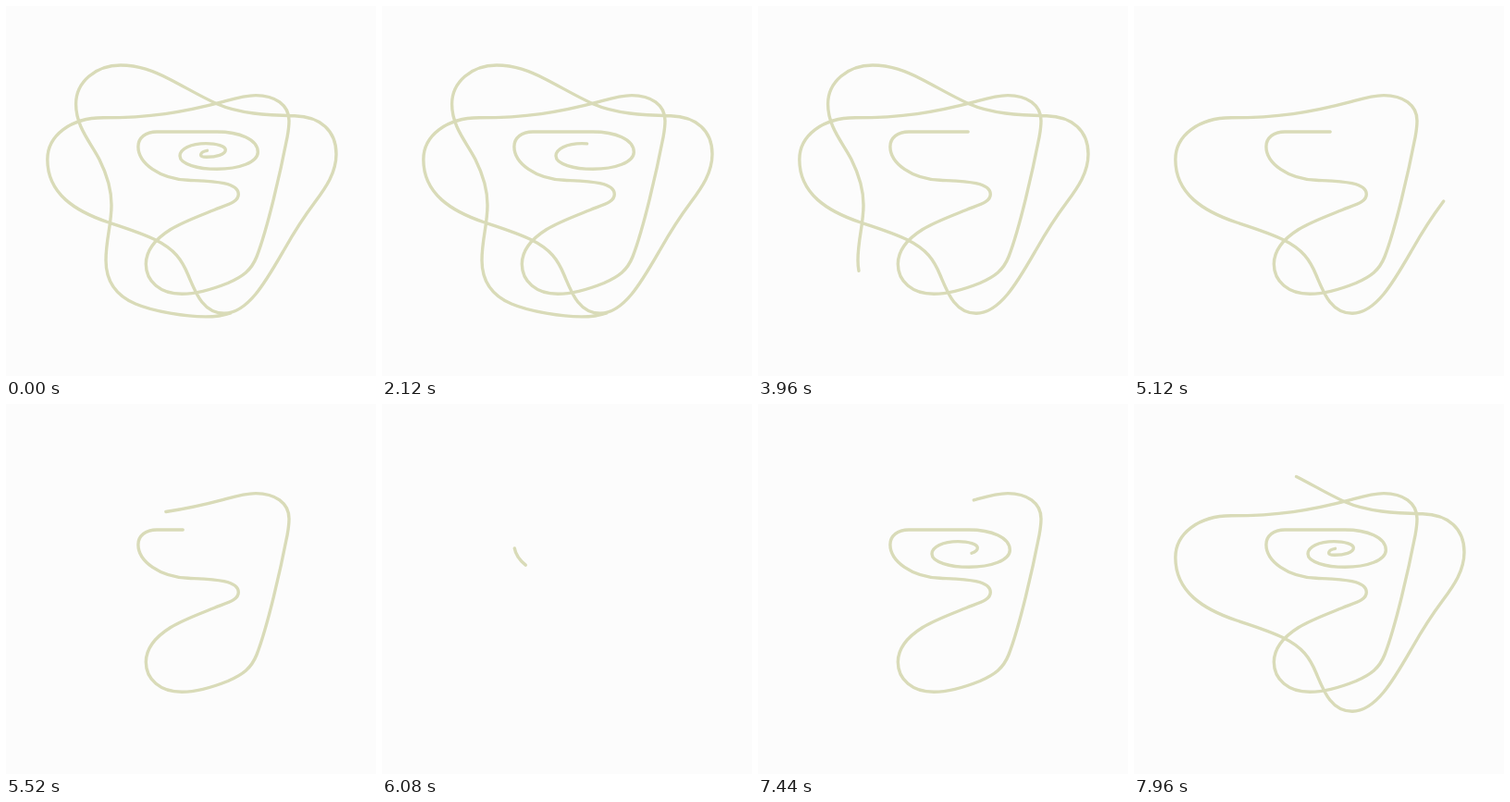
An HTML page that plays this animation: 400 by 400 pixels, repeating every 8000 ms.

```html
<!DOCTYPE html>
<html lang="en">
<head>
<meta charset="utf-8">
<title>Looping line</title>
<style>
  html, body { margin: 0; width: 100%; height: 100%; overflow: hidden; background: #fcfcfc; }
  svg { display: block; width: 100%; height: 100%; }
  path { fill: none; stroke: #d9dbb8; stroke-width: 3.4; stroke-linecap: round; stroke-linejoin: round; }
</style>
</head>
<body>
<svg viewBox="0 0 400 400">
  <path id="line" d="M217.5 156.3
    C213.5 157 210.6 158.7 210.6 161 C210.6 163 213.5 163.3 217 163.3
    C227 163.3 237.3 160.5 237.3 155.5 C237.3 151.5 228 148.6 216 148.6
    C200 148.6 188 154.5 188 162 C188 171 208 176.3 228 176.3
    C252 176.3 272.3 169 272.3 158 C272.3 144 252 136 228 136
    L163 136 C151 136 142.9 142.5 142.9 152
    C142.9 170 166 187 197 188.3 C220 189.5 251.3 189.5 251.3 203.5
    C251.3 212 240 214.5 225 220.5 C205 228.5 190 234 178 241.5
    C162 251.5 151.3 264 151.3 279 C151.3 298 167 311.3 190 311.3
    C206 311.3 225 305.5 240 299.5 C256 292.5 265 286 271 271
    C283 240 297 178 304 142 C305.5 134 306 130 306 124
    C306 107 291 96.6 270 96.6 C258 96.6 247 100 236 103.2
    C190 115.5 155 120.8 105 120.8 C70 120.8 44.8 140 44.8 166
    C44.8 203 75 222 111 234 C131 240.5 147 245.5 162 253
    C182 263 190 274 197 291 C205 310 213 332.3 236 332.3
    C262 332.3 282 296 301 263 C312 243.5 322 228 334 212
    C346 196 357 180 357 160 C357 135 340 119.5 312 118.8
    C282 118 252 116.5 228 105.8 C210 97.5 195 88.5 178 79.7
    C159 70 143 64 124 64 C97 64 75.6 82 75.6 106
    C75.6 131 92 148 101 166 C109 182 114 198 114 215
    C114 237 108 252 108 275 C108 300 121 314 140 322
    C160 330.5 195 336 216 335.9 C226 335.9 235 334.5 243 331.8"/>
</svg>
<script>
const LOOP = 8000;
const line = document.getElementById('line');
const total = line.getTotalLength();

// Length along the line closest to (x, y), searched around a rough guess.
function lengthAt(x, y, guess) {
  let best = 0, bestDist = Infinity;
  const last = Math.min(total, guess + 80);
  for (let s = Math.max(0, guess - 80); s <= last; s += 0.5) {
    const p = line.getPointAtLength(s);
    const dist = Math.hypot(p.x - x, p.y - y);
    if (dist < bestDist) { bestDist = dist; best = s; }
  }
  return best;
}

// Smooth monotone curve through keys of [time, length].
function monotone(keys) {
  const n = keys.length;
  const rise = i => (keys[i + 1][1] - keys[i][1]) / (keys[i + 1][0] - keys[i][0]);
  const slope = keys.map((_, i) => {
    if (i === 0 || i === n - 1) return 0;
    const a = rise(i - 1), b = rise(i);
    return a * b > 0 ? 2 * a * b / (a + b) : 0;
  });
  return t => {
    if (t <= keys[0][0]) return keys[0][1];
    if (t >= keys[n - 1][0]) return keys[n - 1][1];
    let i = 0;
    while (t > keys[i + 1][0]) i++;
    const [t0, v0] = keys[i], [t1, v1] = keys[i + 1];
    const h = t1 - t0, u = (t - t0) / h, w = 1 - u;
    return v0 * (1 + 2 * u) * w * w + slope[i] * h * u * w * w
         + v1 * u * u * (3 - 2 * u) - slope[i + 1] * h * u * u * w;
  };
}

const track = stops => monotone(stops.map(([t, x, y, guess]) => [t, lengthAt(x, y, guess)]));

// Stops: time, point on the line, rough length there.
// One tip runs outward, the other inward; they cross near 6100 ms.
const outward = track([
  [200, 217.5, 156.3, 0], [1000, 210.8, 160, 8], [1840, 237, 157, 37],
  [2120, 222, 149, 55], [2680, 255, 171.5, 167], [3520, 246, 137.5, 229],
  [3960, 228, 136, 247], [5120, 213, 136, 262], [6080, 143, 155, 342],
  [6880, 158, 259, 579], [7440, 236, 103.2, 987], [7720, 357, 157, 1686],
  [7960, 178, 79.7, 1889], [8200, 75.6, 106, 2015]
]);
const inward = track([
  [2500, 243, 331.8, total], [3520, 176, 332, 2293], [3960, 108.3, 284, 2202],
  [4360, 101, 167, 2083], [5120, 334, 212, 1624], [5200, 280, 297, 1526],
  [6080, 155.5, 173.5, 364], [6880, 190, 168, 104], [7440, 231, 161, 31],
  [7960, 217.5, 156.3, 0]
]);

function draw(t) {
  const a = outward(t), b = inward(t);
  const from = Math.min(a, b), size = Math.abs(a - b);
  line.setAttribute('stroke-dasharray', `${size} ${total * 2}`);
  line.setAttribute('stroke-dashoffset', -from);
}

const start = performance.now();
function tick() {
  draw((performance.now() - start) % LOOP);
  requestAnimationFrame(tick);
}
tick();
</script>
</body>
</html>
```
